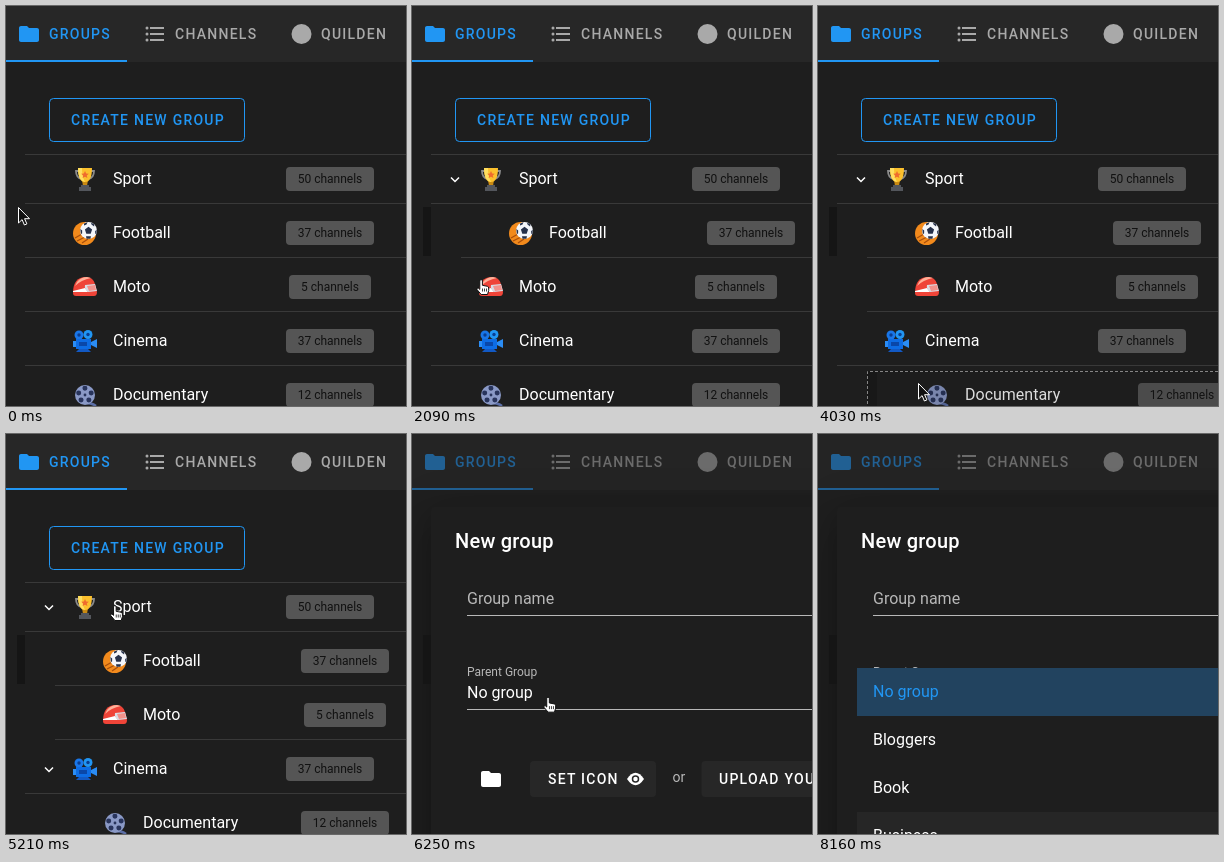
Recreate the animation shown at these times as an HTML page. Size 400 px wide and 400 px high, loop 8460 ms.

```html
<!DOCTYPE html>
<html lang="en">
<head>
<meta charset="utf-8">
<title>Channel groups</title>
<style>
  html, body { margin: 0; width: 100%; height: 100%; overflow: hidden; background: #1e1e1e; }
  body { position: relative; font-family: Roboto, sans-serif; }
  svg, div { position: absolute; }
  body > svg, #dim { left: 0; top: 0; width: 400px; height: 400px; }
  div svg { left: 0; top: 0; }
  text { font-size: 16px; fill: #fff; white-space: pre; }
  .btn { font-size: 14px; font-weight: 500; letter-spacing: 1.25px; }
  .small { font-size: 12px; }
  .blue { fill: #2196f3; }
  .gray { fill: #a9a9a9; }
  .soft { fill: #b8b8b8; }
  .chip { text-anchor: middle; fill: #111; }
  #dim { background: #212121; }
  #dialog, #menu { background: #1e1e1e; border-radius: 4px; }
  #dialog { left: 19px; top: 73px; width: 762px; height: 500px; transform-origin: 381px 217px;
    box-shadow: 0 11px 15px -7px #0003, 0 24px 38px 3px #00000024, 0 9px 46px 8px #0000001f; }
  #menu { left: 39px; top: 234px; width: 722px; height: 304px; border-radius: 0; }
</style>
</head>
<body>
<svg viewBox="0 0 400 400">
  <defs>
    <path id="folder" d="M10 4H4c-1.1 0-2 .9-2 2v12c0 1.1.9 2 2 2h16c1.1 0 2-.9 2-2V8c0-1.1-.9-2-2-2h-8z"/>
    <g id="trophy">
      <path d="M6 4H3q0 7 6 8M18 4h3q0 7-6 8" fill="none" stroke="#8b8b8b" stroke-width="1.8"/>
      <path d="M9 13h6l-1 6h-4z" fill="#c98a12"/>
      <path d="M5 1h14q0 14-7 14T5 1z" fill="#fbc02d"/>
      <path d="M5 1h4q0 9 3 14Q5 14 5 1z" fill="#ffdf60"/>
      <path d="M12 4l1.2 2.4 2.6.3-2 1.8.6 2.6-2.4-1.4-2.4 1.4.6-2.6-2-1.8 2.6-.3z" fill="#ef6c2e"/>
      <path d="M8 18h8v2h2v4H6v-4h2z" fill="#53565c"/>
    </g>
    <g id="football">
      <circle cx="11.5" cy="12.5" r="11.5" fill="#f28a1c"/>
      <path d="M2 17l7-4M4 20l8-4M9 22l6-4" stroke="#a94f0c" stroke-width="1.3"/>
      <circle cx="15.5" cy="9.5" r="8.5" fill="#f4f6fa"/>
      <path d="M15.5 5.8l3.6 2.7-1.4 4.2h-4.4l-1.4-4.2zM11 2.5l3.5-1.3-1 2.2-2.5 1.1zM18 1.5l3.4 2-.3 2-2.6-2zM7.3 8l1.9 1.6-.1 2.9-1.2.6zM23.8 8.5l-1.7 1.7.2 2.6 1 .3zM13 15.2h5l-.6 2.5-3.9.1z" fill="#26314a"/>
    </g>
    <g id="helmet">
      <path d="M0 18Q0 2 13 2q7 0 9 7l2 8q0 4-3 4H3q-3 0-3-3z" fill="#ef4438"/>
      <path d="M4 7q4-5 10-5l4 1Q8 5 2 11z" fill="#ffb199"/>
      <path d="M0 16l12-3 3 4H0z" fill="#fff"/>
      <path d="M12 10l10-1 2 7-9 1q-4-3-3-7z" fill="#d9dde5"/>
      <path d="M14 11l8-1 1 5-7 1z" fill="#f3928c"/>
    </g>
    <g id="camera">
      <circle cx="6" cy="6" r="4.5" fill="#1976e8"/>
      <circle cx="15" cy="5.5" r="4.5" fill="#2196f3"/>
      <circle cx="6" cy="6" r="1.7" fill="#0a3d91"/>
      <circle cx="15" cy="5.5" r="1.7" fill="#0a3d91"/>
      <path d="M3 10h15v10H3z" fill="#0d6ce4"/>
      <path d="M18 13l6-3v9l-6-3zM0 12h3v6H0z" fill="#2b8df5"/>
      <path d="M6 13h8v4H6z" fill="#0a47a8"/>
      <path d="M6 20h9l3 3H3z" fill="#1259c4"/>
    </g>
    <g id="reel">
      <path d="M13 20q6 0 10 3" fill="none" stroke="#5b6ea6" stroke-width="2.5"/>
      <circle cx="12" cy="12" r="10" fill="#8a99c6"/>
      <path d="M12 3.5v.01M20 9.5v.01M17 18.3v.01M7 18.3v.01M4 9.5v.01" transform="translate(2.6 2.6) scale(.78)" stroke="#28345c" stroke-width="6.4" stroke-linecap="round"/>
      <circle cx="12" cy="12" r="1.4" fill="#28345c"/>
    </g>
  </defs>

  <path d="M0 0h400v56H0z" fill="#272727"/>
  <path class="blue" d="M0 54h121v2H0z"/>
  <use href="#folder" class="blue" x="11" y="16"/>
  <text class="btn blue" x="43" y="33">GROUPS</text>
  <path class="gray" d="M144 21h14v2h-14zm0 6h14v2h-14zm0 6h14v2h-14z"/>
  <path d="M141 22v.01M141 28v.01M141 34v.01" stroke="#a9a9a9" stroke-width="3" stroke-linecap="round"/>
  <text class="btn gray" x="169" y="33">CHANNELS</text>
  <circle class="gray" cx="295.5" cy="28" r="10"/>
  <text class="btn gray" x="315" y="33">QUILDEN</text>

  <rect id="create" x="43.5" y="92.5" width="195" height="43" rx="4" fill="#2196f3" fill-opacity="0" stroke="#2196f3"/>
  <text class="btn blue" x="65" y="119">CREATE NEW GROUP</text>
  <path d="M19 148h381v1H19z" fill="#393939"/>
  <path id="strip" d="M11 201h8v49h-8z" fill="#151515"/>
  <g id="rows"></g>
</svg>

<div id="dim"></div>

<div id="dialog">
  <svg viewBox="19 73 762 500" width="762" height="500">
    <text x="43" y="114" style="font-size:20px;font-weight:500;letter-spacing:.25px">New group</text>
    <text class="soft" x="55" y="170">Group name</text>
    <path class="soft" d="M55 181h690v1H55zM55 275h690v1H55z"/>
    <text class="small soft" x="55" y="242">Parent Group</text>
    <text x="55" y="264">No group</text>
    <use href="#folder" fill="#fff" x="67" y="333"/>
    <rect x="118" y="327" width="126" height="36" rx="4" fill="#272727"/>
    <text class="btn" x="136" y="350">SET ICON</text>
    <path d="M215 345q8.500-12.500 17 0q-8.500 12.500-17 0z" fill="#fff"/>
    <circle cx="223.500" cy="345" r="3" fill="#fff" stroke="#272727" stroke-width="1.500"/>
    <text class="soft" x="260.500" y="348" style="font-size:14px">or</text>
    <rect x="289.500" y="327" width="200" height="36" rx="4" fill="#272727"/>
    <text class="btn" x="307" y="350">UPLOAD YOUR ICON</text>
  </svg>
</div>

<div id="menu"><svg id="items" viewBox="39 234 722 304" width="722" height="304"></svg></div>

<svg viewBox="0 0 400 400">
  <path id="arrow" d="M.5.5v15.500l3.600-3.400 2.300 5.400 2.500-1.100-2.300-5.200h4.900z" fill="#111" stroke="#fff"/>
  <g id="hand">
    <path d="M3.800 2q0-1.500 1.300-1.500T6.400 2v4.300l5 1q1.300.4 1.300 1.700v2.500l-1.200 4H5.200L1 10.600Q.4 8.800 2.200 8.900l1.600 1.500z" fill="#fff" stroke="#111"/>
    <path d="M6.500 9.500v3M8.500 9.500v3M10.500 9.500v3" stroke="#111" stroke-width=".8"/>
  </g>
</svg>

<script>
const LOOP = 8460;
const $ = id => document.getElementById(id);
const clamp = v => Math.min(1, Math.max(0, v));
const easeOut = u => 1 - (1 - clamp(u)) ** 3;

// The screen refreshes in bursts: first time, last time, count
const bursts = [[0, 150, 2], [450, 1190, 6], [1640, 2090, 4], [2390, 2540, 2], [2980, 3880, 7], [4030, 4030, 1],
  [4480, 5510, 8], [5660, 6690, 8], [6840, 7860, 8], [8010, 8160, 2]];
const ticks = bursts.flatMap(([a, b, n]) =>
  Array.from({ length: n }, (_, i) => n > 1 ? a + (b - a) * i / (n - 1) : a));

// Pointer: time, x, y
const path = [[0, 12, 201], [150, 15, 231], [450, 32, 230], [600, 44, 227], [1190, 85, 227], [1640, 85, 227],
  [2090, 69, 273], [2240, 69, 273], [2540, 110, 273], [2980, 110, 273], [3730, 60, 377], [4030, 100, 377],
  [4480, 100, 377], [5220, 111, 118], [5660, 111, 118], [6250, 136, 263], [6690, 136, 263], [6990, 142, 240],
  [8010, 316, 394], [8160, 322, 412], [LOOP, 322, 412]];

const groups = [["trophy", "Sport", 50], ["football", "Football", 37], ["helmet", "Moto", 5],
  ["camera", "Cinema", 37], ["reel", "Documentary", 12]];
const drags = [
  { row: 1, parent: 0, start: 740, end: 1640, grab: 44 },
  { row: 2, parent: 0, start: 2390, end: 2980, grab: 69 },
  { row: 4, parent: 3, start: 3880, end: 4480, grab: 60 }];

function pointer(t) {
  const i = Math.max(1, path.findIndex(p => p[0] >= t));
  const [a, b] = [path[i - 1], path[i]];
  const u = (t - a[0]) / (b[0] - a[0]);
  return [a[1] + (b[1] - a[1]) * u, a[2] + (b[2] - a[2]) * u];
}

function content(i, y, nested, icon) {
  const [name, label, count] = groups[i];
  const text = count + " channels", w = count > 9 ? 88 : 82, cx = 324 + nested * 15, dx = nested * 30;
  return (icon ? `<use href="#${name}" x="${67 + dx}" y="${y - 12}"/>` : "") +
    `<text x="${107 + dx}" y="${y + 5}">${label}</text>
    <rect x="${cx - w / 2}" y="${y - 12}" width="${w}" height="24" rx="4" fill="#555"/>
    <text class="small chip" x="${cx}" y="${y + 4}">${text}</text>`;
}

function dragged(i, y, off) {
  const x = off < 25 ? 19 : 49, top = y - 24;
  return `<path d="M${x} ${top}H400v48H${x}z" fill="#181818"/>
    <g transform="translate(${off})" opacity=".85">
      <path d="M19 ${top + 1}h400v46H19z" fill="#1e1e1e"/>${content(i, y, 0, true)}</g>
    <g fill="none" stroke-dasharray="3 2"><path d="M400 ${top + .5}H${x + .5}v47" stroke="#858585"/>
      <path d="M${x} ${top + 47.5}H400" stroke="#2196f3"/></g>`;
}

function list(t, drag, px) {
  return groups.map((_, i) => {
    const y = 173 + 54 * i - (drag && i > drag.row ? 1 : 0);
    if (drag && drag.row === i) return dragged(i, y, px - drag.grab);
    const nested = drags.some(d => d.row === i && t >= d.end) ? 1 : 0;
    const open = drags.some(d => d.parent === i && t >= d.end);
    // Icons from the dropped row on reload for a moment
    const reload = drags.some(d => i >= d.row && t >= d.end && t < d.end + 140);
    return content(i, y, nested, !reload) +
      `<path d="M${nested ? 49 : 19} ${y + 24}H400v1H${nested ? 49 : 19}z" fill="#393939"/>` +
      (open ? `<path d="M39 ${y - 1.5}l4 4 4-4" fill="none" stroke="#fff" stroke-width="1.5"/>` : "");
  }).join("");
}

function menuItems(p, py) {
  const lift = 60 * (1 - p);
  return ["Bloggers", "Book", "Business"].map((name, i) => {
    const y = 282 + 48 * i;
    return (py >= y && py < y + 48 ? `<path d="M39 ${y}h722v48H39z" fill="#262626"/>` : "") +
      `<text x="55" y="${y + 29 - lift}" fill-opacity="${p ** 3}">${name}</text>`;
  }).join("") + `<path d="M39 234h722v48H39z" fill="#22435f"/><text class="blue" x="55" y="263">No group</text>`;
}

function draw(t) {
  const [x, y] = pointer(t);
  const drag = drags.find(d => t >= d.start && t < d.end);
  const dialog = easeOut((t - 5220) / 530), menu = easeOut((t - 6250) / 460);
  const onButton = y > 92 && y < 136;

  $("strip").style.display = t < 150 ? "none" : "";
  $("rows").innerHTML = list(t, drag, x);
  $("create").setAttribute("fill-opacity", onButton ? .08 : 0);

  $("dim").style.opacity = .46 * dialog;
  $("dialog").style.opacity = dialog;
  $("dialog").style.transform = dialog < 1 ? `scale(${.5 + dialog / 2})` : "none";
  $("menu").style.opacity = menu;
  $("items").innerHTML = menuItems(menu, y);

  const hand = !drag && (dialog ? y > 232 : onButton || (x >= 19 && y > 148));
  $("arrow").style.display = hand ? "none" : "";
  $("hand").style.display = hand ? "" : "none";
  $("arrow").setAttribute("transform", `translate(${x} ${y})`);
  $("hand").setAttribute("transform", `translate(${x - 5} ${y})`);
}

let shown = -1;
function frame() {
  const now = performance.now() % LOOP;
  const tick = ticks.filter(s => s <= now).pop();
  if (tick !== shown) draw(shown = tick);
  requestAnimationFrame(frame);
}
frame();
</script>
</body>
</html>
```
